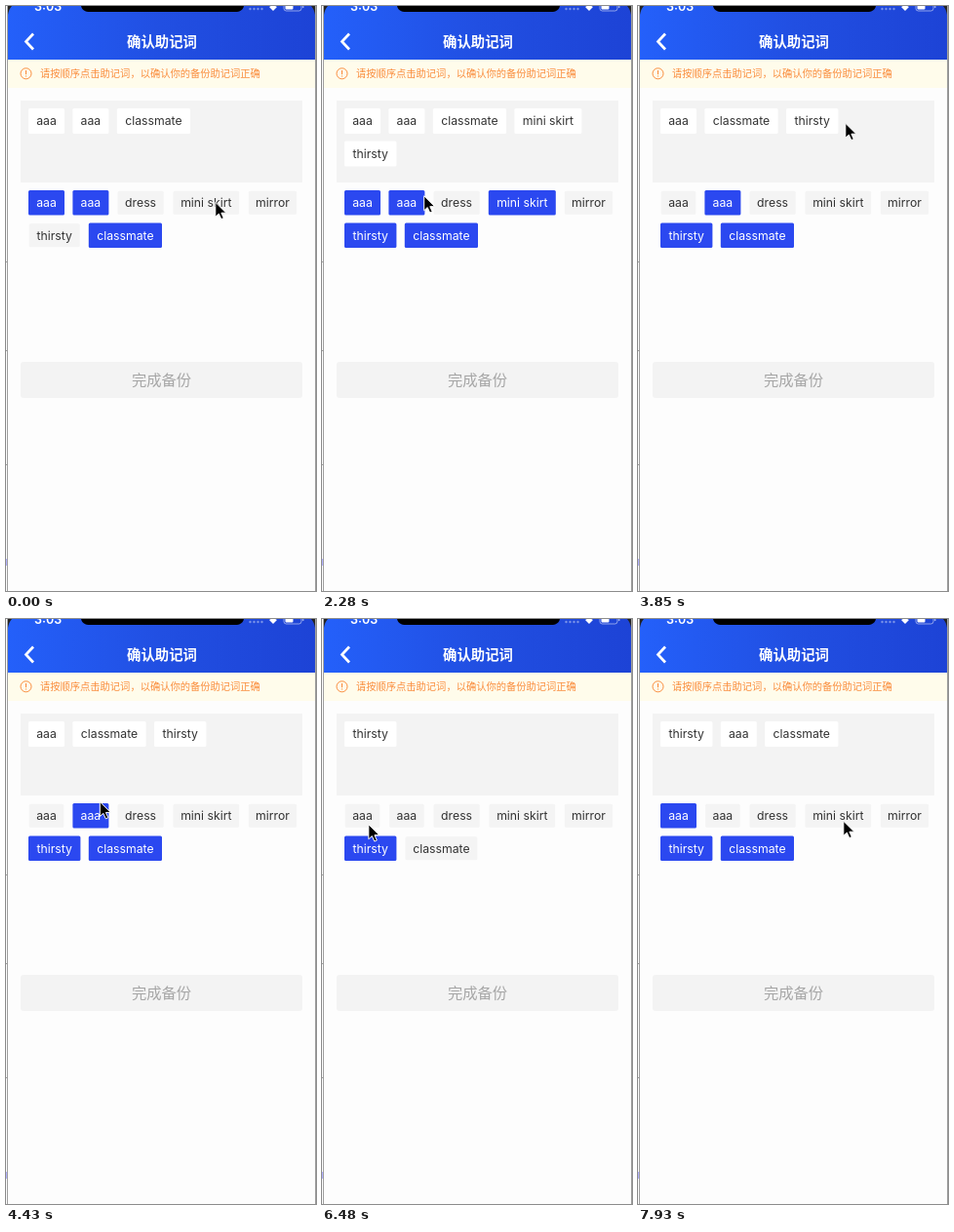
An HTML page that plays this animation: 318 px wide and 600 px high, repeating every 8 s.

```html
<!DOCTYPE html>
<html lang="zh-CN">
<head>
<meta charset="utf-8">
<style>
  html, body { margin: 0; width: 100%; height: 100%; overflow: hidden; background: #fdfdfd; }
  svg { display: block; }
  text { font-family: "Noto Sans CJK SC", "Noto Sans CJK", sans-serif; }
  .latin { font-family: Inter, sans-serif; }
  .chip { font-size: 12.25px; text-anchor: middle; }
</style>
</head>
<body>
<svg width="318" height="600" viewBox="0 0 318 600">
  <defs>
    <linearGradient id="blue">
      <stop offset="0" stop-color="#2460fa"/>
      <stop offset=".5" stop-color="#214fe2"/>
      <stop offset="1" stop-color="#1d43d6"/>
    </linearGradient>
  </defs>
  <rect width="318" height="600" fill="#fdfdfd"/>

  <!-- header and status bar -->
  <rect x="2" width="315" height="55" fill="url(#blue)"/>
  <path d="M1 0H6Q3 3 2 9H1ZM318 0H313Q316 3 317 9H318Z" fill="#222"/>
  <path d="M77 0C78 4 81 6 86 6H235C240 6 243 4 244 0Z" fill="#000"/>
  <text class="latin" x="29" y="5" font-size="12.5" font-weight="600" fill="#fff">3:03</text>
  <g fill="#fff">
    <path d="M250.5 3H263" stroke="#fff" stroke-width="2.4" stroke-linecap="round"
      stroke-dasharray="0 4" opacity=".4"/>
    <path d="M270 1Q274 -2 278 1L274 5Z"/>
    <rect x="286.5" y="-3" width="8" height="6.5" rx="1"/>
    <rect x="285" y="-5" width="18" height="10" rx="2.5" fill="none" stroke="#fff" stroke-opacity=".5"/>
    <rect x="304" y="-1" width="1.5" height="3" opacity=".5"/>
  </g>
  <path d="M28 28.5L20.5 36.5L28 44.5" fill="none" stroke="#fff" stroke-width="2.7"/>
  <text x="160" y="41.5" font-size="14.4" font-weight="700" text-anchor="middle" fill="#fff">确认助记词</text>

  <!-- notice -->
  <rect x="2" y="55" width="315" height="29" fill="#fffceb"/>
  <circle cx="20.5" cy="69.3" r="5.5" fill="none" stroke="#fa8c3c"/>
  <path d="M20.5 66V70.2M20.5 71.4V72.6" stroke="#fa8c3c" stroke-width="1.1"/>
  <text x="35" y="73.2" font-size="10.27" fill="#fa8c3c">请按顺序点击助记词，以确认你的备份助记词正确</text>

  <rect x="15" y="97" width="289" height="84" fill="#f3f3f3"/>
  <rect x="15" y="365" width="289" height="37" rx="3" fill="#f3f3f3"/>
  <text x="159.5" y="389.2" font-size="15.3" text-anchor="middle" fill="#a6a6a6">完成备份</text>

  <!-- window edges -->
  <path d="M1.5 0V600M317.5 0V600" stroke="#a0a0a0"/>
  <path d="M0 262.5H1M0 353.5H1M0 470.5H1" stroke="#999"/>
  <path d="M0 567V574" stroke="#66f"/>

  <g id="chips"></g>
  <path id="cursor" d="M.8 .3V15.3L4.3 12.1L6.8 17.6L9.3 16.5L6.9 11.2H11.8Z" fill="#000" stroke="#fff"/>
</svg>
<script>
const LOOP = 8000, LEFT = 23, RIGHT = 301, GAP = 8.4, ROW = 33.5;
const REST = 130, AIM = 200; // pointer pause after and before a click, in ms

const words = [['aaa', 37], ['aaa', 37], ['dress', 48.6], ['mini skirt', 69],
  ['mirror', 50.6], ['thirsty', 53.4], ['classmate', 75.2]];
const initial = [0, 1, 6];

// Each click toggles a word; "bend" is the control point of a curved approach.
const clicks = [
  { at: 170, word: 3, to: [214, 201] },
  { at: 1220, word: 5, to: [31, 239], bend: [-36, 278] },
  { at: 3090, word: 0, to: [43, 118], bend: [177, 190], rest: 600 },
  { at: 3850, word: 3, to: [212, 120] },
  { at: 4900, word: 6, to: [86, 121], bend: [74, 268] },
  { at: 5590, word: 1, to: [42, 118] },
  { at: 6770, word: 0, to: [44, 200], bend: [68, 286] },
  { at: 7470, word: 6, to: [115, 239] },
  { at: 8130, word: 3, to: [210, 207], rest: 0 },
];

const chips = document.getElementById('chips');
const cursor = document.getElementById('cursor');
let shown;

function chosenAt(t) {
  return clicks.filter(c => c.at <= t).reduce((list, { word }) =>
    list.includes(word) ? list.filter(i => i !== word) : [...list, word], initial);
}

function flow(items, top, draw) {
  let x = LEFT, y = top;
  return items.map(i => {
    const w = words[i][1];
    if (x + w > RIGHT) { x = LEFT; y += ROW; }
    const svg = draw(i, x, y, w);
    x += w + GAP;
    return svg;
  }).join('');
}

function chip(i, x, y, w, h, fill, color) {
  return `<rect x="${x}" y="${y}" width="${w}" height="${h}" rx="1.5" fill="${fill}"/>` +
    `<text class="latin chip" x="${x + w / 2}" y="${y + h / 2 + 4.3}" fill="${color}">${words[i][0]}</text>`;
}

function drawChips(chosen) {
  chips.innerHTML =
    flow(chosen, 105, (i, x, y, w) => chip(i, x, y, w, 26, '#fff', '#333')) +
    flow([...words.keys()], 189, (i, x, y, w) => chosen.includes(i)
      ? chip(i, x, y, w, 25.4, '#2b48f0', '#fff')
      : chip(i, x + .7, y + .7, w - 1.4, 24, '#f4f4f4', '#333'));
}

function pointerAt(t) {
  const k = Math.max(1, clicks.findIndex(c => c.at > t));
  const from = clicks[k - 1], { at, to, bend, rest = REST } = clicks[k];
  const start = from.at + rest;
  const u = Math.min(1, Math.max(0, (t - start) / (at - AIM - start)));
  const e = (u + u * u * (3 - 2 * u)) / 2;
  return to.map((end, axis) => {
    const a = from.to[axis], b = bend ? bend[axis] : (a + end) / 2;
    return (1 - e) ** 2 * a + 2 * e * (1 - e) * b + e * e * end;
  });
}

function frame() {
  const t = performance.now() % LOOP;
  const chosen = chosenAt(t), key = chosen.join();
  if (key !== shown) {
    shown = key;
    drawChips(chosen);
  }
  cursor.setAttribute('transform', `translate(${pointerAt(t)})`);
  requestAnimationFrame(frame);
}
frame();
</script>
</body>
</html>
```
